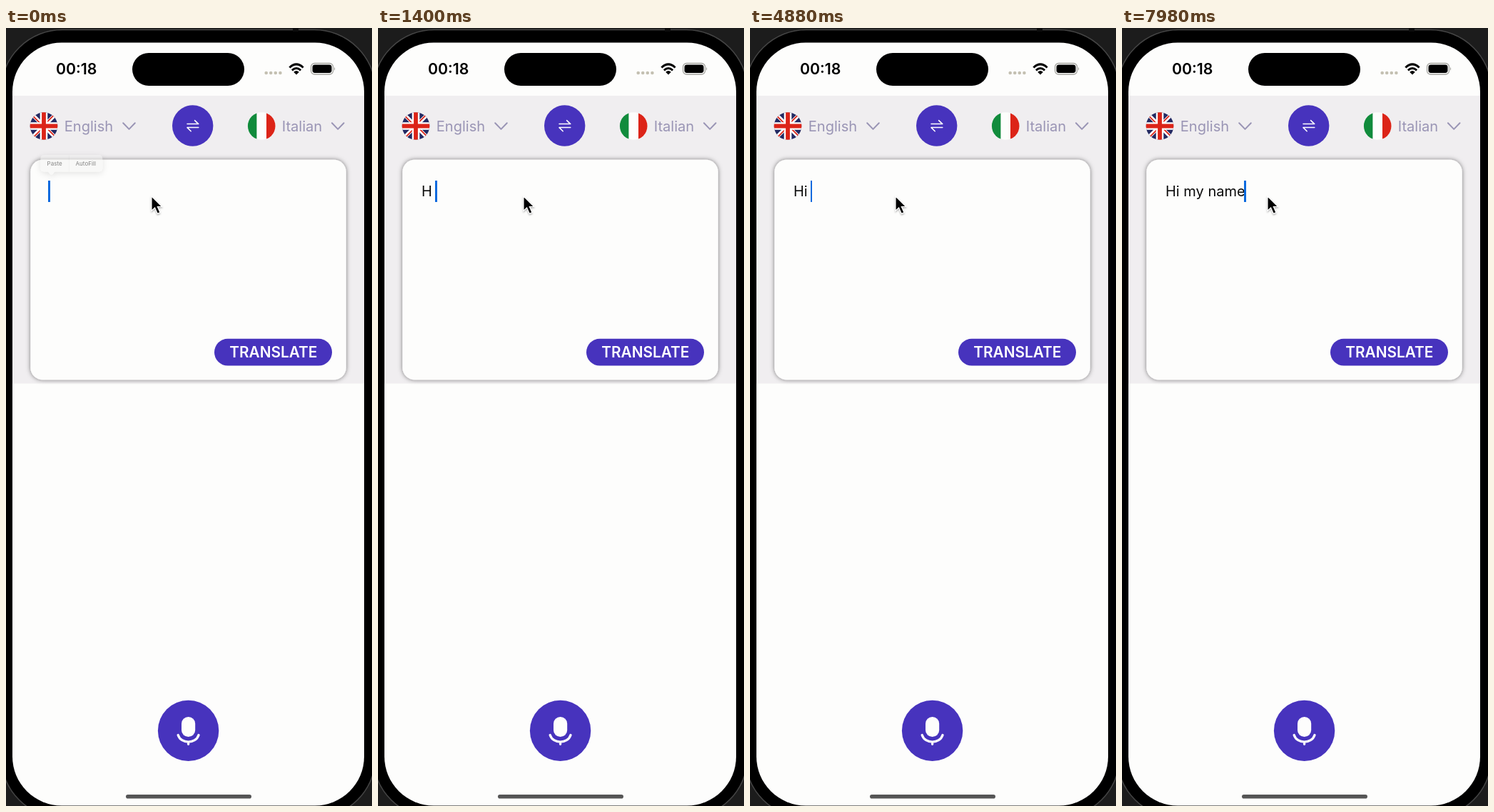
Animation of 513 by 1091 pixels, one loop 8 s. Source, as an HTML page:

```html
<!DOCTYPE html>
<html lang="en">
<head>
<meta charset="utf-8">
<title>Translator</title>
<style>
html, body { margin: 0; width: 100%; height: 100%; overflow: hidden; background: #000; }
svg { position: absolute; left: 0; top: 0; }
svg, #entry { font-family: Inter, "Open Sans", sans-serif; }
#entry { position: absolute; left: 61px; top: 213.5px; font-size: 20px; line-height: 30px; white-space: pre; color: #0c0c0c; }
#caret { display: inline-block; vertical-align: top; width: 2.8px; height: 30px; margin-left: -1.8px; background: #0a6ade; }
.label { font-size: 20.1px; fill: #9a95b5; }
.line { fill: none; stroke-linecap: round; stroke-linejoin: round; }
</style>
</head>
<body>
<svg width="513" height="1091" viewBox="0 0 513 1091">
  <defs>
    <clipPath id="screen"><rect x="9" y="20.5" width="493" height="1070" rx="69"/></clipPath>
    <clipPath id="disc"><circle r="19.3"/></clipPath>
    <filter id="cardShadow" x="-10%" y="-10%" width="120%" height="120%">
      <feDropShadow dx="0" dy="0" stdDeviation="3" flood-color="#000" flood-opacity=".52"/>
    </filter>
    <filter id="menuShadow" x="-30%" y="-60%" width="160%" height="240%">
      <feDropShadow dx="0" dy="5" stdDeviation="10" flood-color="#000" flood-opacity=".22"/>
    </filter>
    <filter id="pointerShadow" x="-50%" y="-50%" width="200%" height="200%">
      <feDropShadow dx="0" dy="1.5" stdDeviation="1.3" flood-color="#000" flood-opacity=".35"/>
    </filter>
    <path id="chevron" class="line" d="M-8.3 -4.2 0 4.4 8.3 -4.2" stroke="#9a95b5" stroke-width="2"/>
  </defs>

  <!-- phone body -->
  <rect width="513" height="1091" fill="#1c1c1c"/>
  <rect x="-7" y="2.5" width="525" height="1105" rx="86" fill="#000" stroke="#454545" stroke-width="1.5"/>
  <rect x="402" y="0" width="8" height="5" fill="#0c0c0c"/>

  <!-- screen -->
  <g clip-path="url(#screen)">
    <rect y="20" width="513" height="1071" fill="#fdfdfc"/>
    <rect y="95" width="513" height="403.5" fill="#f0eef0"/>
  </g>
  <rect x="177" y="35" width="157" height="46" rx="23" fill="#000"/>

  <!-- status bar -->
  <text x="98.7" y="65.4" text-anchor="middle" font-size="21.3" font-weight="600">00:18</text>
  <g fill="#c4c0b2">
    <circle cx="364.7" cy="63" r="2.3"/><circle cx="371.2" cy="63" r="2.3"/>
    <circle cx="377.8" cy="63" r="2.3"/><circle cx="384.4" cy="63" r="2.3"/>
  </g>
  <path class="line" style="stroke-linecap:butt" d="M397.4 55.5Q407 46.3 416.6 55.5M400.9 59.4Q407 53.7 413.1 59.4" stroke="#000" stroke-width="2.9"/>
  <path d="M407 65.5 403.2 61.7Q407 58.4 410.8 61.7Z"/>
  <rect x="427.5" y="49.5" width="31" height="15.5" rx="5" fill="none" stroke="#a5a5a0" stroke-width="1.3"/>
  <rect x="429.5" y="51.5" width="27" height="11.5" rx="3.4"/>
  <path d="M460 54.7Q462.4 57.3 460 59.8Z" fill="#a5a5a0"/>

  <!-- languages -->
  <g transform="translate(53 137.5)"><g clip-path="url(#disc)" stroke="#fff">
    <rect x="-20" y="-20" width="40" height="40" fill="#232a63" stroke="none"/>
    <path d="M-20-20 20 20M20-20-20 20" stroke-width="5.2"/>
    <path d="M-.6 .6-20.6-19.4M.6-.6 20.6 19.4M-.6-.6 19.4-20.6M.6 .6-19.4 20.6" stroke="#dc2418" stroke-width="1.8"/>
    <path d="M0-20V20M-20 0H20" stroke-width="10.6"/>
    <path d="M0-20V20M-20 0H20" stroke="#dc2418" stroke-width="5.8"/>
  </g></g>
  <text class="label" x="81.7" y="145.3">English</text>
  <use href="#chevron" x="172.5" y="137.5"/>
  <g transform="translate(358.2 137.5)"><g clip-path="url(#disc)">
    <rect x="-20" y="-20" width="40" height="40" fill="#fdfdfc"/>
    <rect x="-20" y="-20" width="13.2" height="40" fill="#118b3c"/>
    <rect x="6.8" y="-20" width="14" height="40" fill="#dc2418"/>
  </g></g>
  <text class="label" x="386.7" y="145.3">Italian</text>
  <use href="#chevron" x="465.2" y="137.5"/>
  <circle cx="261.7" cy="137" r="28.7" fill="#4733bd"/>
  <path class="line" d="M254 134.6H269.8L264.6 129.6M269.8 139.6H254L259.2 144.7" stroke="#fff" stroke-width="1.5"/>

  <!-- input card -->
  <rect x="34.3" y="184.8" width="442.4" height="308.4" rx="17" fill="#fdfdfc" filter="url(#cardShadow)"/>
  <rect x="292" y="435.8" width="165" height="37.8" rx="18.9" fill="#4733bd"/>
  <text x="374.8" y="462.4" text-anchor="middle" font-size="20.8" font-weight="600" fill="#fff">TRANSLATE</text>

  <!-- microphone -->
  <circle cx="255.6" cy="985.4" r="42.7" fill="#4733bd"/>
  <rect x="246" y="966" width="19.2" height="28" rx="9.6" fill="#fdfdfc"/>
  <path class="line" d="M241.2 991.5C245 1004.2 266.2 1004.2 270 991.5M255.6 1001.5V1004.3" stroke="#fdfdfc" stroke-width="3.3"/>
  <rect x="168" y="1075" width="176" height="5.6" rx="2.8" fill="#555"/>

  <!-- edit menu -->
  <g id="menu">
    <path d="M41 146H209Q220 146 220 157V185Q220 196 209 196H76C71 196 68 205.5 63.5 205.5S56 196 51 196H41Q30 196 30 185V157Q30 146 41 146Z" fill="#f5f5f4" filter="url(#menuShadow)"/>
    <path d="M117.2 146V196" stroke="#d9d9d8"/>
    <g font-size="17.7" fill="#111">
      <text x="73" y="178" text-anchor="middle">Paste</text>
      <text x="168.5" y="178" text-anchor="middle">AutoFill</text>
    </g>
  </g>

  <!-- pointer -->
  <path d="M204 236V256.2L208.6 251.9 212.3 260.2 215.9 258.7 212.3 250.5H218.6Z" fill="#000" stroke="#fff" stroke-width="1.1" filter="url(#pointerShadow)"/>
</svg>
<div id="entry"><span id="typed"></span><span id="caret"></span></div>

<script>
const LOOP = 8000, FADE = 320;
const $ = id => document.getElementById(id);
const clamp = x => Math.min(1, Math.max(0, x));

// [time, text from then on]
const edits = [
  [0, ""], [880, "H"], [1400, "H "], [2800, "H"], [4340, "Hi"], [4860, "Hi "],
  [5600, "Hi m"], [5880, "Hi my"], [6440, "Hi my "],
  [6980, "Hi my n"], [7240, "Hi my na"], [7560, "Hi my nam"], [7960, "Hi my name"]
];

// caret fades: [start, opacity at the end]
const fades = [
  [200, 0], [600, 1], [1980, 0], [2360, 1], [2780, 0], [3200, 1], [3620, 0], [4040, 1],
  [4880, 0], [5160, 1], [5580, 0], [5870, 1], [6140, 0], [6420, 1],
  [6560, 0], [6980, 1], [7400, 0], [7820, 1]
];
// these keystrokes show the caret at once
const flashes = [880, 4860, 5880, 6440, 7960];

function caretOpacity(t) {
  const [start, end] = fades.findLast(f => f[0] <= t) || [-FADE, 1];
  const p = clamp((t - start) / FADE);
  const flash = flashes.findLast(f => f <= t);
  const glow = flash === undefined ? 0 : clamp(1.3 - (t - flash) / 200);
  return Math.max(end ? p : 1 - p, glow);
}

function drawMenu(t) {
  const open = 1 - (1 - clamp(t / 260)) ** 3;
  const scale = 0.45 + 0.55 * open;
  const shown = clamp(0.5 + t / 200) * clamp(1 - (t - 880) / 220);
  $("menu").setAttribute("transform", `translate(64 205.5) scale(${scale}) translate(-64 -205.5)`);
  $("menu").setAttribute("opacity", shown);
}

function frame() {
  const t = performance.now() % LOOP;
  drawMenu(t);
  $("typed").textContent = edits.findLast(e => e[0] <= t)[1];
  $("caret").style.opacity = caretOpacity(t);
  requestAnimationFrame(frame);
}
frame();
</script>
</body>
</html>
```
